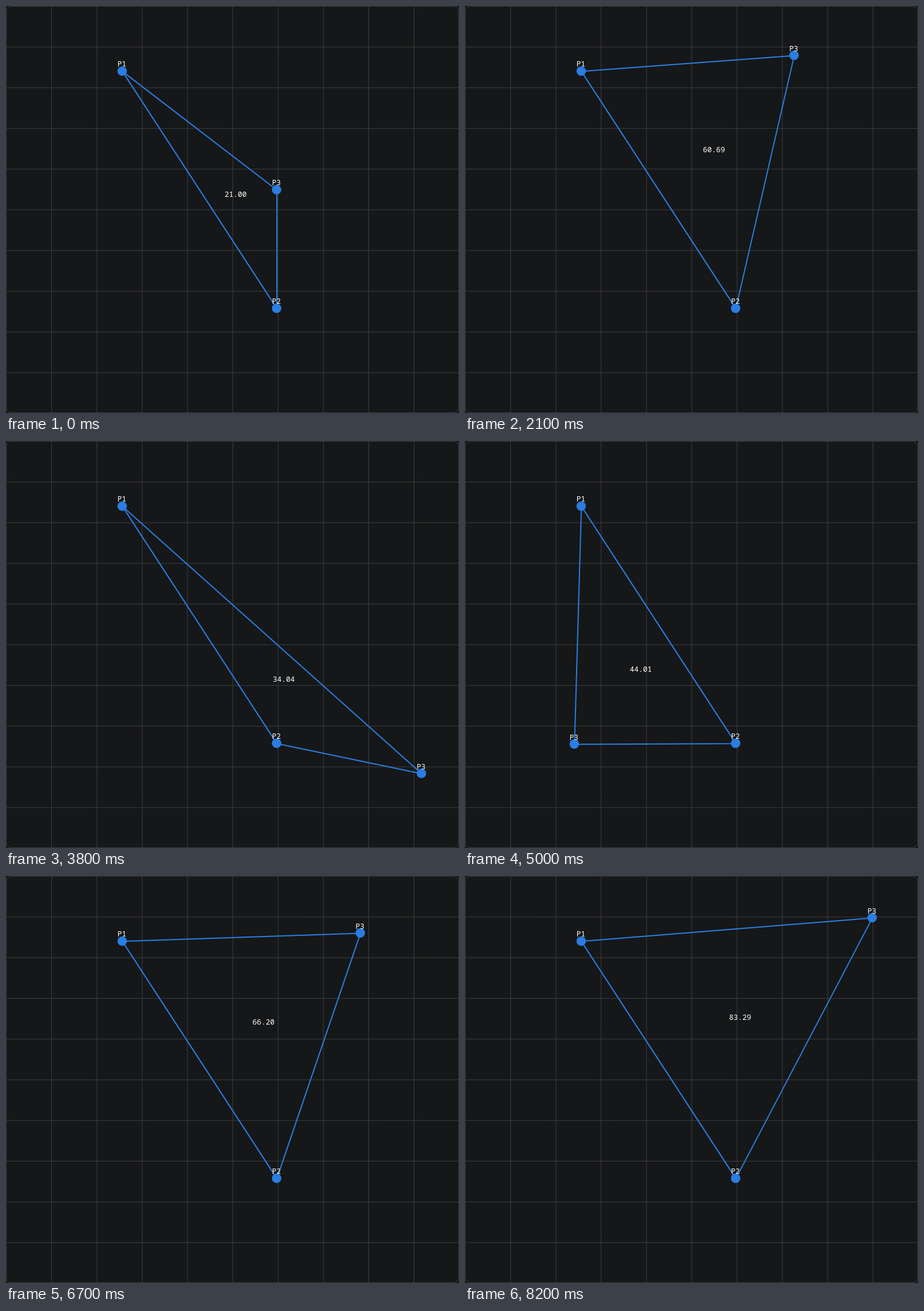
An HTML page with a canvas for the animation above (9310 ms loop, 771 by 693 pixels).

```html
<!DOCTYPE html>
<html lang="en">
<head>
<meta charset="utf-8">
<title>Triangle area</title>
<style>
  html, body { margin: 0; width: 100%; height: 100%; overflow: hidden; background: #161718; }
  canvas { display: block; }
</style>
</head>
<body>
<canvas id="stage" width="771" height="693"></canvas>
<script>
const W = 771, H = 693, LOOP = 9310, STEP = 100;
const BLUE = '#2a7de1', GRID = '#3c3e43';
const ctx = document.getElementById('stage').getContext('2d');

// The plot spans -10..10 on both axes inside a 10 px padding
const UX = (W - 20) / 20, UY = (H - 20) / 20;
const place = (x, y) => [W / 2 + x * UX, H / 2 - y * UY];
const p1 = place(-5, 7), p2 = place(2, -5);

// Turning points of the dragged corner: step, x, y
const keys = [
  [3, ...place(2, 1)], [13, 701, 73], [17, 590, 155], [21, 560, 84], [29, 641, 122],
  [32, 686, 128], [35, 722, 330], [38, 707, 566], [42, 453, 608], [47, 124, 540],
  [50, 186, 516], [52, 207, 470], [58, 430, 190], [64, 602, 91], [67, 603, 97],
  [71, 570, 230], [74, 600, 270], [78, 737, 71], [80, 737, 71], [82, 693, 71]
];
const last = keys.length - 1;

const slope = (i, c) => (keys[i + 1][c] - keys[i][c]) / (keys[i + 1][0] - keys[i][0]);

// Tangent that never overshoots a key
function tangent(i, c) {
  if (i === 0 || i === last) return 0;
  const a = slope(i - 1, c), b = slope(i, c);
  return a * b > 0 ? 2 * a * b / (a + b) : 0;
}

function dragAt(step) {
  const s = Math.min(Math.max(step, keys[0][0]), keys[last][0]);
  const i = Math.max(0, keys.findIndex(k => s <= k[0]) - 1);
  const a = keys[i], b = keys[i + 1], d = b[0] - a[0], u = (s - a[0]) / d, v = 1 - u;
  return [1, 2].map(c =>
    v * v * (1 + 2 * u) * a[c] + u * u * (1 + 2 * v) * b[c] +
    d * u * v * (v * tangent(i, c) - u * tangent(i + 1, c)));
}

function drawGrid() {
  ctx.fillStyle = '#161718';
  ctx.fillRect(0, 0, W, H);
  ctx.strokeStyle = GRID;
  ctx.lineWidth = 1;
  ctx.beginPath();
  for (let k = 1; k < 10; k++) {
    const x = k * W / 10 + 0.5, y = k * H / 10 + 0.5;
    ctx.moveTo(x, 0);
    ctx.lineTo(x, H);
    ctx.moveTo(0, y);
    ctx.lineTo(W, y);
  }
  ctx.roundRect(0.5, 0.5, W - 1, H - 1, 9);
  ctx.stroke();
}

function drawTriangle(points) {
  ctx.strokeStyle = ctx.fillStyle = BLUE;
  ctx.lineWidth = 2;
  ctx.lineJoin = 'round';
  ctx.beginPath();
  points.forEach(([x, y]) => ctx.lineTo(x + 0.4, y + 0.4));
  ctx.closePath();
  ctx.stroke();
  for (const [x, y] of points) {
    ctx.beginPath();
    ctx.arc(x, y, 8, 0, 2 * Math.PI);
    ctx.fill();
  }
}

function drawLabels(points) {
  const [[ax, ay], [bx, by], [cx, cy]] = points;
  const area = Math.abs((bx - ax) * (cy - ay) - (by - ay) * (cx - ax)) / (2 * UX * UY);
  ctx.font = '500 12.5px "Noto Sans Mono", "DejaVu Sans Mono", monospace';
  ctx.fillStyle = '#fff';
  ctx.textAlign = 'center';
  points.forEach(([x, y], i) => ctx.fillText('P' + (i + 1), x - 0.4, y - 7.5));
  ctx.textAlign = 'left';
  ctx.fillText(area.toFixed(2), (ax + bx + cx) / 3 - 1, (ay + by + cy) / 3 + 12.5);
}

function frame(now) {
  const points = [p1, p2, dragAt(Math.floor(now % LOOP / STEP))];
  drawGrid();
  drawTriangle(points);
  drawLabels(points);
  requestAnimationFrame(frame);
}
requestAnimationFrame(frame);
</script>
</body>
</html>
```
